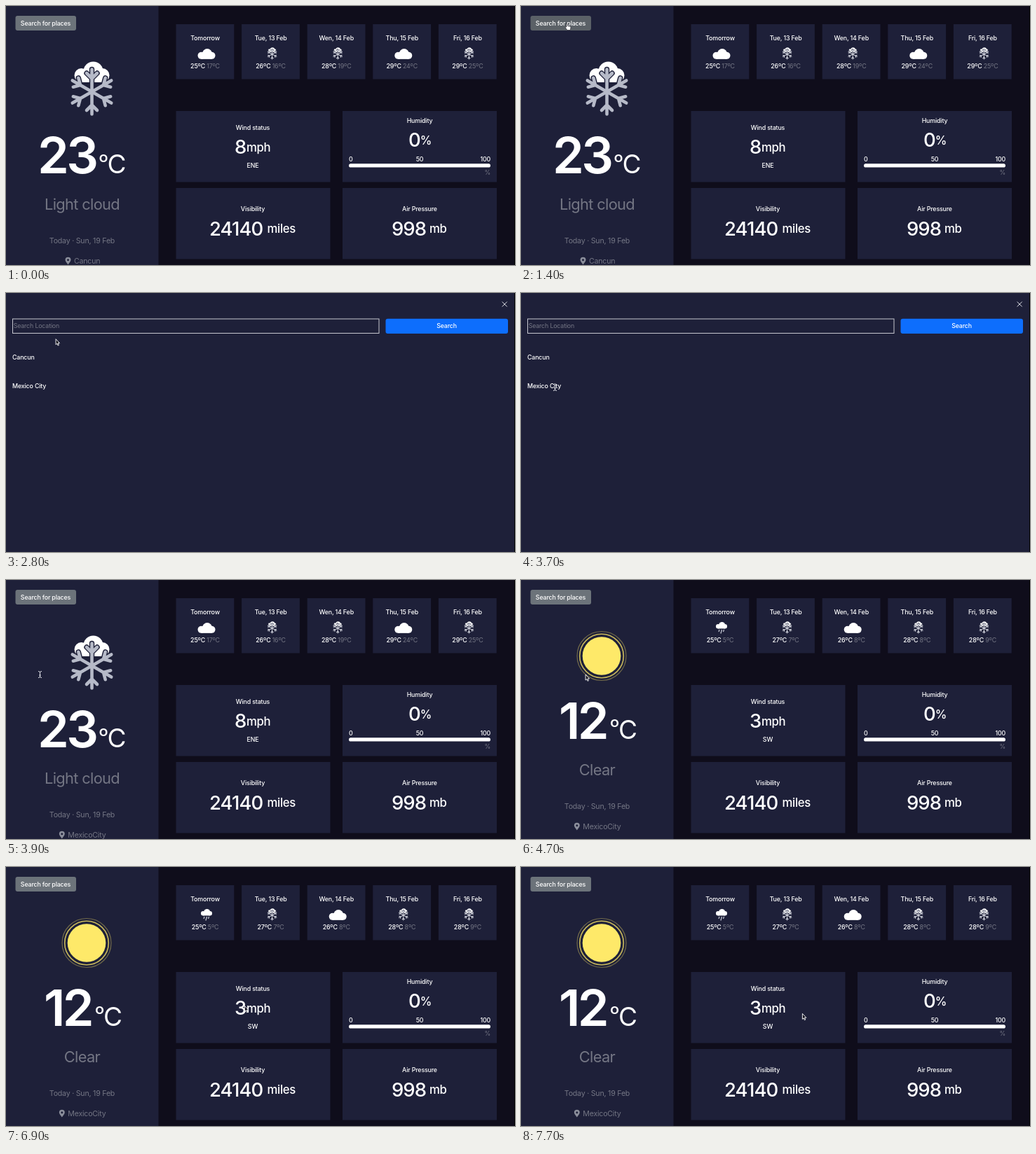
An HTML page that plays this animation: 726 px wide and 370 px high, repeating every 8000 ms.

```html
<!DOCTYPE html>
<html lang="en">
<head>
<meta charset="utf-8">
<title>Weather dashboard</title>
<style>
  html, body { margin: 0; width: 100%; height: 100%; overflow: hidden; background: #0f0d1b; }
  svg { display: block; width: 726px; height: 370px; }
  text { font-family: Inter, "Liberation Sans", sans-serif; font-size: 8.9px; font-weight: 500; letter-spacing: -.02em; fill: #fff; white-space: pre; }
  .mid { text-anchor: middle; }
  .end { text-anchor: end; }
  .dim { fill: #747684; font-weight: 400; }
  .num { font-size: 27.5px; letter-spacing: -.035em; }
  .unit { font-size: 16.8px; }
  .temp { font-size: 72px; font-weight: 600; letter-spacing: -.05em; }
  .deg { font-size: 37px; font-weight: 400; letter-spacing: -.03em; }
  .ring { font-size: 27px; font-weight: 500; }
  .sky { font-size: 21.8px; letter-spacing: -.03em; }
  .side { font-size: 10.6px; }
</style>
</head>
<body>
<svg id="stage" viewBox="0 0 726 370" xmlns="http://www.w3.org/2000/svg"></svg>
<script>
const LOOP = 8000, STEP = 100;
const OPEN = 1800, PICK = 3900, LOADED = 4700;
const PANEL = '#1e2039';

const text = (x, y, cls, str) => `<text x="${x}" y="${y}" class="${cls}">${str}</text>`;
const rect = (x, y, w, h, fill, extra = '') =>
  `<rect x="${x}" y="${y}" width="${w}" height="${h}" fill="${fill}" ${extra}/>`;
const place = (x, y, scale, body) => `<g transform="translate(${x} ${y}) scale(${scale})">${body}</g>`;
const group = (id, body) => `<g id="${id}">${body}</g>`;

// Cloud centred on the origin, about 50 by 30
const cloud = `<g fill="#fff"><circle cx="-15" cy="4.5" r="10"/><circle cx="2" cy="-1" r="14"/>
  <circle cx="15" cy="4.500" r="10"/>${rect(-15, 2, 30, 12.5, '#fff')}</g>`;

const arms = [0, 60, 120, 180, 240, 300].map(a =>
  `<path transform="rotate(${a})" d="M0 0V-32M-7.500 -26.500L0 -19L7.500 -26.500"/>`).join('');
const flake = (color, width) =>
  `<g fill="none" stroke="${color}" stroke-width="${width}" stroke-linecap="round" stroke-linejoin="round">${arms}</g>`;
const snow = color => place(0, -28, 1, cloud) + flake(PANEL, 7.4) + flake(color, 4.6);

const icons = {
  cloud: x => place(x, 68.6, .5, cloud),
  snow: x => place(x, 68.8, .225, snow('#d3d5de')),
  rain: x => place(x, 64.8, .32, cloud) +
    `<path d="M${x - 3} 71l-1 3M${x + .5} 71l-1.6 5.5M${x + 3.5} 71l-1 3" stroke="#c9ccd8" stroke-width="1.2" fill="none"/>`
};

const sun = `<g fill="none"><circle cx="115" cy="108.5" r="35" stroke="#716a4b" stroke-width="1.2"/>
  <circle cx="115" cy="108.5" r="31.3" stroke="#c9b95c" stroke-width="1.6"/>
  <circle cx="115" cy="108.5" r="27.3" fill="#fee969"/></g>`;

const days = ['Tomorrow', 'Tue, 13 Feb', 'Wen, 14 Feb', 'Thu, 15 Feb', 'Fri, 16 Feb'];
const cardX = i => 242.5 + i * 93.6;

function forecast(list) {
  return list.map(([icon, hi, lo], i) => {
    const x = cardX(i) + 41.5;
    return icons[icon](x + 2) +
      text(x, 88.5, 'mid', `${hi}ºC <tspan class="dim">${lo}ºC</tspan>`);
  }).join('');
}

const celsius = '<tspan class="ring" dy="-7.3">º</tspan><tspan dy="7.3">C</tspan>';

function summary(temp, tempX, degX, sky, shift) {
  return `<g transform="translate(0 ${shift})">` +
    text(tempX, 239, 'temp', temp) + text(degX, 239, 'deg', celsius) +
    text(108.5, 291, 'mid dim sky', sky) +
    text(108.5, 339, 'mid dim side', 'Today · Sun, 19 Feb') + '</g>';
}

const city = (name, x, y) => text(x, y, 'dim side', name) +
  `<path transform="translate(${x - 8.5} ${y})" fill="#8b8e9b" fill-rule="evenodd"
    d="M0 1.5C-1.5-1-4-3-4-5.200A4 4 0 0 1 4-5.200C4-3 1.500-1 0 1.500ZM0-6.700A1.500 1.500 0 1 0 0-3.700A1.500 1.500 0 0 0 0-6.700Z"/>`;

const wind = (speed, dir) => text(326, 211, 'num', speed) + text(352, 231.2, 'mid', dir);

const dashboard =
  rect(0, 0, 726, 370, '#0f0d1b') + rect(0, 0, 217.5, 370, PANEL) +
  rect(13.5, 14, 86.5, 21, '#6c737a', 'rx="3" id="button"') + text(56.5, 27.5, 'mid', 'Search for places') +
  days.map((d, i) => rect(cardX(i), 26, 82.8, 78.5, PANEL) + text(cardX(i) + 41.5, 49.2, 'mid', d)).join('') +
  [242.5, 480].map(x => rect(x, 150, 220, 101.5, PANEL) + rect(x, 260, 220, 101.5, PANEL)).join('') +
  text(352, 176.8, 'mid', 'Wind status') + text(343, 207.5, 'unit', 'mph') +
  text(590, 167, 'mid', 'Humidity') + text(574, 201, 'num', '0') + text(590.8, 197.6, 'unit', '%') +
  text(489, 221.6, '', '0') + text(590, 221.6, 'mid', '50') + text(691, 221.6, 'end', '100') +
  rect(489, 225.2, 202, 5.4, '#fff', 'rx="2.7"') + text(691, 241.2, 'end dim', '%') +
  text(352, 293.4, 'mid', 'Visibility') + text(290, 328, 'num', '24140') + text(372.5, 324.3, 'unit', 'miles') +
  text(590, 293.4, 'mid', 'Air Pressure') + text(550, 328, 'num', '998') + text(604, 324.3, 'unit', 'mb');

const before = place(122.5, 122.5, 1, snow('#b6bac8')) +
  summary('23', 45, 132.5, 'Light cloud', 0) + wind('8', 'ENE') +
  forecast([['cloud', 25, 17], ['snow', 26, 16], ['snow', 28, 19], ['cloud', 29, 24], ['snow', 29, 25]]);

const after = sun + summary('12', 54, 127, 'Clear', -12.5) + wind('3', 'SW') +
  forecast([['rain', 25, 5], ['snow', 27, 7], ['cloud', 26, 8], ['snow', 28, 8], ['snow', 28, 9]]);

const search = rect(0, 0, 726, 370, PANEL) +
  '<path d="M707.7 12.500l7 7m0-7l-7 7" stroke="#e4e5ea" stroke-width="1"/>' +
  rect(9.5, 37, 522.5, 20.5, 'none', 'stroke="#c6c7cf"') + text(10.7, 50.4, 'dim', 'Search Location') +
  rect(541.5, 36.7, 174.5, 21.2, '#0d6efd', 'rx="3"') + text(628.5, 50.4, 'mid', 'Search') +
  text(9, 95.2, '', 'Cancun') + text(9, 136, '', 'Mexico City');

const pointers =
  group('arrow', '<path d="M.4.4V8.400L2.200 6.800 3.400 9.700 4.700 9.100 3.500 6.300H5.900Z" fill="#15141f" stroke="#fff" stroke-width=".9" stroke-linejoin="round"/>') +
  group('hand', '<path d="M-2.200-4.500Q-1.300-5.200-.7-4.300L-.3-1.500 3-1Q4.200-.5 4 1L3.200 4.500H-1L-3.800.8Q-3.500-.4-2-.1Z" fill="#fff" stroke="#15141f" stroke-width=".6"/>') +
  group('beam', '<path d="M-2.500-4.500Q0-4.500 0-3Q0-4.500 2.500-4.500M0-3.500V3.500M-2.500 4.500Q0 4.500 0 3Q0 4.500 2.500 4.500M-1.300 1H1.300" fill="none" stroke="#dcdde4" stroke-width="1"/>');

document.getElementById('stage').innerHTML =
  dashboard + group('before', before) + group('after', after) +
  group('cancun', city('Cancun', 97, 367.9)) +
  group('mexico', city('MexicoCity', 88.3, 367.9)) +
  group('search', search) + rect(725, 0, 1, 370, '#000') + group('cursor', pointers);

// time, x, y, shape on the way to and at this point
const path = [
  [500, 323, 107, 'arrow'], [700, 198, 24, 'arrow'], [900, 198, 24, 'arrow'],
  [1200, 128, 34, 'arrow'], [1300, 88, 31, 'hand'], [1400, 67, 30, 'hand'], [2500, 67, 30, 'hand'],
  [2700, 70, 50, 'beam'], [3000, 72, 96, 'arrow'], [3200, 58.5, 131, 'beam'], [3500, 58.5, 131, 'beam'],
  [3700, 48.5, 135, 'beam'], [4400, 48.5, 135, 'beam'],
  [5300, 178, 134, 'arrow'], [5600, 256, 171.3, 'arrow'], [6000, 256, 171.3, 'arrow'],
  [6200, 340, 198, 'arrow'], [7500, 340, 198, 'arrow'], [7700, 401, 209, 'arrow'], [LOOP, 401, 209, 'arrow']
];

const el = id => document.getElementById(id);
const show = (id, on) => { el(id).style.display = on ? '' : 'none'; };

function moveCursor(t) {
  show('cursor', t >= path[0][0]);
  if (t < path[0][0]) return;
  const i = Math.max(1, path.findIndex(k => k[0] >= t));
  const [t0, x0, y0] = path[i - 1], [t1, x1, y1, shape] = path[i];
  const p = (t - t0) / (t1 - t0);
  el('cursor').setAttribute('transform', `translate(${x0 + (x1 - x0) * p} ${y0 + (y1 - y0) * p})`);
  for (const id of ['arrow', 'hand', 'beam']) show(id, id === shape);
}

function draw(time) {
  const t = Math.floor(time % LOOP / STEP) * STEP;
  const loaded = t >= LOADED, picked = t >= PICK;
  show('before', !loaded);
  show('after', loaded);
  show('cancun', !picked);
  show('mexico', picked);
  el('mexico').setAttribute('transform', `translate(0 ${loaded ? -12 : 0})`);
  show('search', t >= OPEN && !picked);
  el('button').setAttribute('fill', t >= 1300 && t < OPEN ? '#5b6167' : '#6c737a');
  moveCursor(t);
}

const start = performance.now();
function tick() {
  draw(performance.now() - start);
  requestAnimationFrame(tick);
}
draw(0);
requestAnimationFrame(tick);
</script>
</body>
</html>
```
